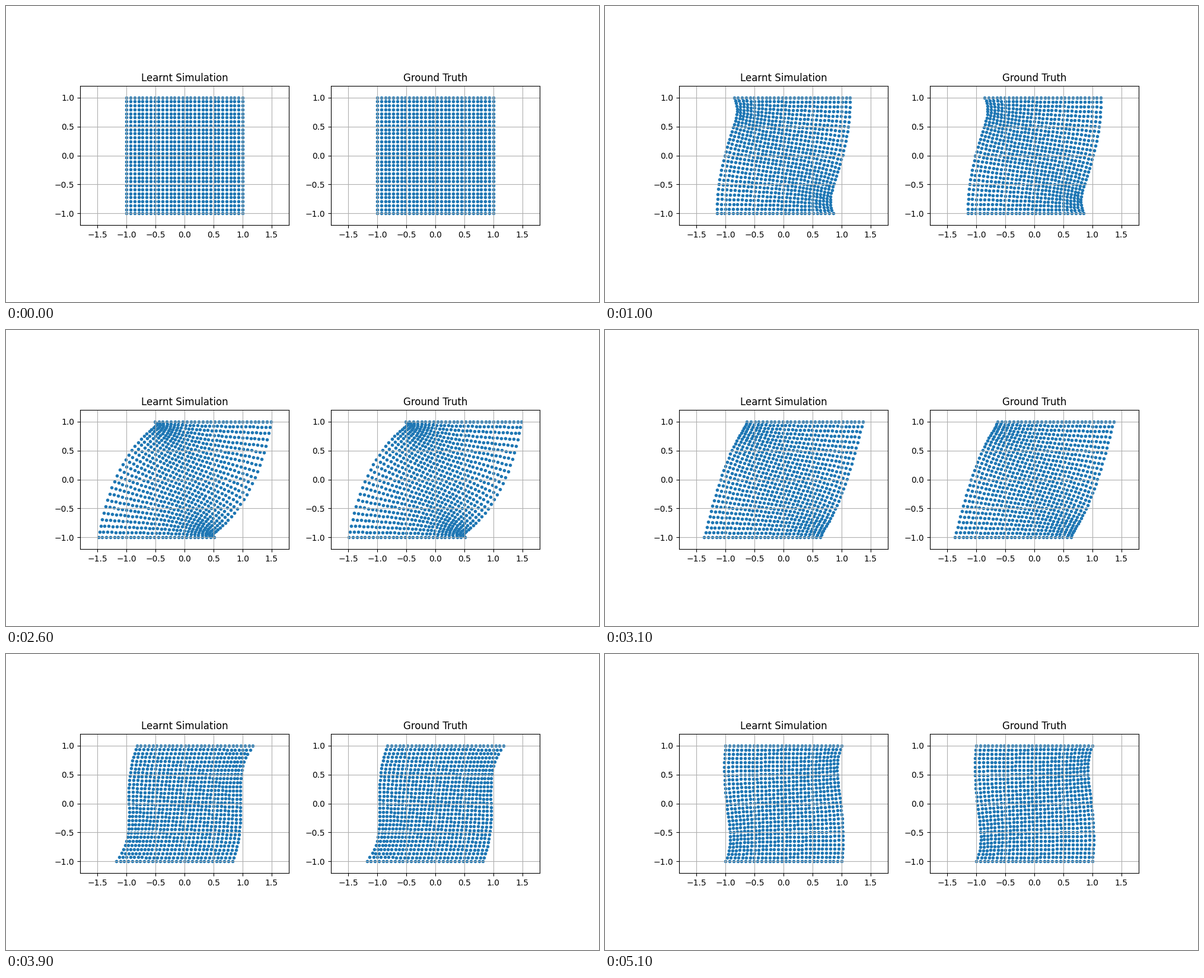
A matplotlib script that plays this animation: 1000 by 500 pixels, repeating every 5.2 s.

```python
import numpy as np
import matplotlib.pyplot as plt
from matplotlib.animation import FuncAnimation

plt.rcParams["font.family"] = "DejaVu Sans"

N = 30
FRAMES, INTERVAL = 52, 100

axis = np.linspace(-1, 1, N)
GX, GY = np.meshgrid(axis, axis)


def wall_shift(t):
    """Travel of the top wall; the bottom wall mirrors it."""
    return np.interp(t, [0.42, 1.2, 2.55, 4.65], [0, 0.197, 0.498, 0])


def lift_profile(y):
    """Vertical slip along a free edge, skewed toward its compressed end."""
    return (1 - y**2) ** 1.3 * (1 + 0.25 * y)


def dent_profile(y):
    """Inward dent of a free edge near its compressed end."""
    return (1 - y**2) * (0.35 + 1.6 * y + 0.6 * y**2)


def from_edges(profile, side):
    """Edge shape fading inward, fastest at the compressed end.

    side is +1 or -1: which end of the left edge is compressed.
    The right edge is the point mirror of the left one.
    """
    def left(x, y):
        return profile(side * y) * ((1 - x) / 2) ** (2.7 + 1.3 * side * y)

    return left(GX, GY) - left(-GX, -GY)


def positions(t):
    shift = wall_shift(t)
    recent = shift - wall_shift(t - 1)  # the sheet also reacts to wall speed
    lift = 0.77 * shift + 0.46 * recent
    dent = 0.13 * shift + 0.60 * recent
    x = GX + shift * GY + abs(dent) * from_edges(dent_profile, np.sign(dent))
    y = GY + lift * from_edges(lift_profile, np.sign(lift))
    return np.column_stack([x.ravel(), y.ravel()])


fig, axes = plt.subplots(1, 2, figsize=(10, 5), dpi=100)
clouds = []
for ax, title in zip(axes, ("Learnt Simulation", "Ground Truth")):
    clouds.append(ax.scatter(GX, GY, marker=".", color="#1f77b4"))
    ax.set_aspect("equal")
    ax.set_xlim(-1.8, 1.8)
    ax.set_ylim(-1.2, 1.2)
    ax.set_title(title)
    ax.grid(True)


def update(frame):
    points = positions(frame * INTERVAL / 1000)
    for cloud in clouds:
        cloud.set_offsets(points)
    return clouds


anim = FuncAnimation(fig, update, frames=FRAMES, interval=INTERVAL,
                     repeat=True, repeat_delay=0)
plt.show()
```
